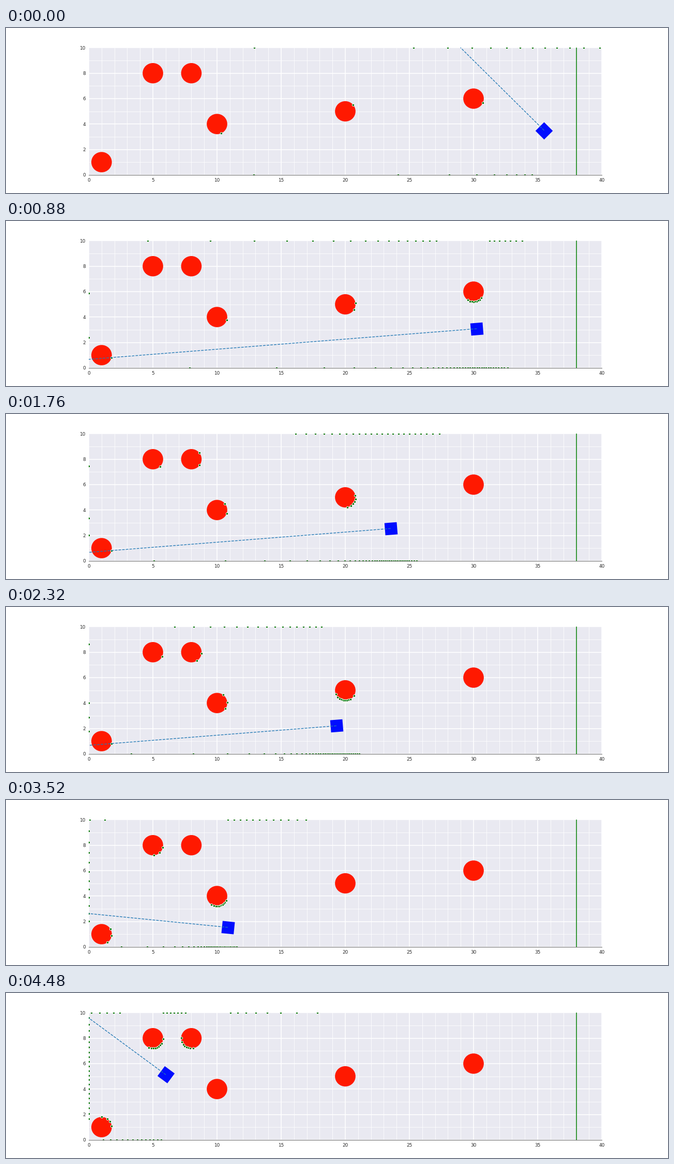
A matplotlib script that plays this animation: 1280 by 320 pixels, repeating every 4.56 s.

```python
import numpy as np
import matplotlib.pyplot as plt
from matplotlib.animation import FuncAnimation
from matplotlib.ticker import MultipleLocator

FRAMES, INTERVAL = 57, 80
OBSTACLES = [(1, 1), (5, 8), (8, 8), (10, 4), (20, 5), (30, 6)]
RADIUS = 0.8
TOP = 10
START, CORNER = np.array([35.5, 3.5]), np.array([10.843, 1.538])
LEG = np.hypot(*(CORNER - START))
HEADINGS = 135, 184.56, 143.4
SCAN_LAG = 0.25

# driven distance and heading over frame number
DRIVE_T = [2.43, 11, 22, 29, 38, 43.5, 45.5, 49, 56]
DRIVE_S = [0, 5.256, 12.0, 16.24, 21.49, LEG, LEG, LEG + 2.01, LEG + 6.02]
TURN_T = [0, 2.43, 43.5, 45.5]
TURN_A = [HEADINGS[0], HEADINGS[1], HEADINGS[1], HEADINGS[2]]


def unit(deg):
    a = np.radians(deg)
    return np.array([np.cos(a), np.sin(a)])


def place(s):
    if s <= LEG:
        return START + s * unit(HEADINGS[1])
    return CORNER + (s - LEG) * unit(HEADINGS[2])


def cast(origin, deg):
    """Nearest hit of one ray with the walls and the obstacles."""
    d = unit(deg)
    reach = [100]
    if d[0] < 0:
        reach.append(-origin[0] / d[0])
    if d[1]:
        reach.append(((TOP if d[1] > 0 else 0) - origin[1]) / d[1])
    for centre in OBSTACLES:
        v = np.array(centre) - origin
        along = v @ d
        disc = RADIUS ** 2 - (v @ v - along ** 2)
        if along > 0 and disc > 0:
            reach.append(along - np.sqrt(disc))
    return origin + min(reach) * d


def scan(origin, heading, rays):
    return np.array([cast(origin, heading + a)
                     for a in np.linspace(-120, 120, rays)])


plt.rcParams["font.family"] = "DejaVu Sans"
fig, ax = plt.subplots(figsize=(20, 5), dpi=64, facecolor="white")
fig.subplots_adjust(left=0.125, right=0.9, bottom=0.11, top=0.88)
ax.set(xlim=(0, 40), ylim=(0, TOP), facecolor="#e9e9f1", axisbelow=True)
ax.xaxis.set_major_locator(MultipleLocator(5))
ax.yaxis.set_major_locator(MultipleLocator(2))
for axis in (ax.xaxis, ax.yaxis):
    axis.set_minor_locator(MultipleLocator(1))
ax.grid(which="major", color="white", lw=1.8)
ax.grid(which="minor", color="white", lw=0.9)
ax.tick_params(which="both", length=0, pad=7, labelsize=10, labelcolor="#262626")
for spine in ax.spines.values():
    spine.set_visible(False)

for centre in OBSTACLES:
    ax.add_patch(plt.Circle(centre, RADIUS, fc="#ff1900", lw=0, zorder=2))
ax.axvline(38.02, color="#078007", lw=1.75, zorder=2)
ax.axhline(0, color="#555555", lw=1, zorder=3.5, clip_on=False)
fig.add_artist(plt.Line2D([0, 1], [0.5 / 320] * 2, color="#999999", lw=1))

dots, = ax.plot([], [], "o", ms=5, mfc="#007000", mec="white", mew=1, zorder=3)
robot, = ax.plot([], [], ms=37.8, color="#000dff", mew=0, ls="", zorder=4)
aim, = ax.plot([], [], "--", color="#1f77b4", lw=1.5, zorder=5)


def draw(i):
    s = np.interp(i, DRIVE_T, DRIVE_S)
    heading = np.interp(i, TURN_T, TURN_A)
    pos = place(s)
    turning = i < TURN_T[1] or TURN_T[2] < i < TURN_T[3]
    lag = 0 if turning else SCAN_LAG
    hits = scan(pos - lag * unit(heading), heading, 75 if i else 30)
    dots.set_data(hits[:, 0], hits[:, 1])
    robot.set_marker((4, 0, heading + 45))
    robot.set_data([pos[0]], [pos[1]])
    end = pos + 60 * unit(heading)
    aim.set_data([pos[0], end[0]], [pos[1], end[1]])
    return dots, robot, aim


anim = FuncAnimation(fig, draw, frames=FRAMES, interval=INTERVAL,
                     repeat=True, repeat_delay=0)
plt.show()
```
